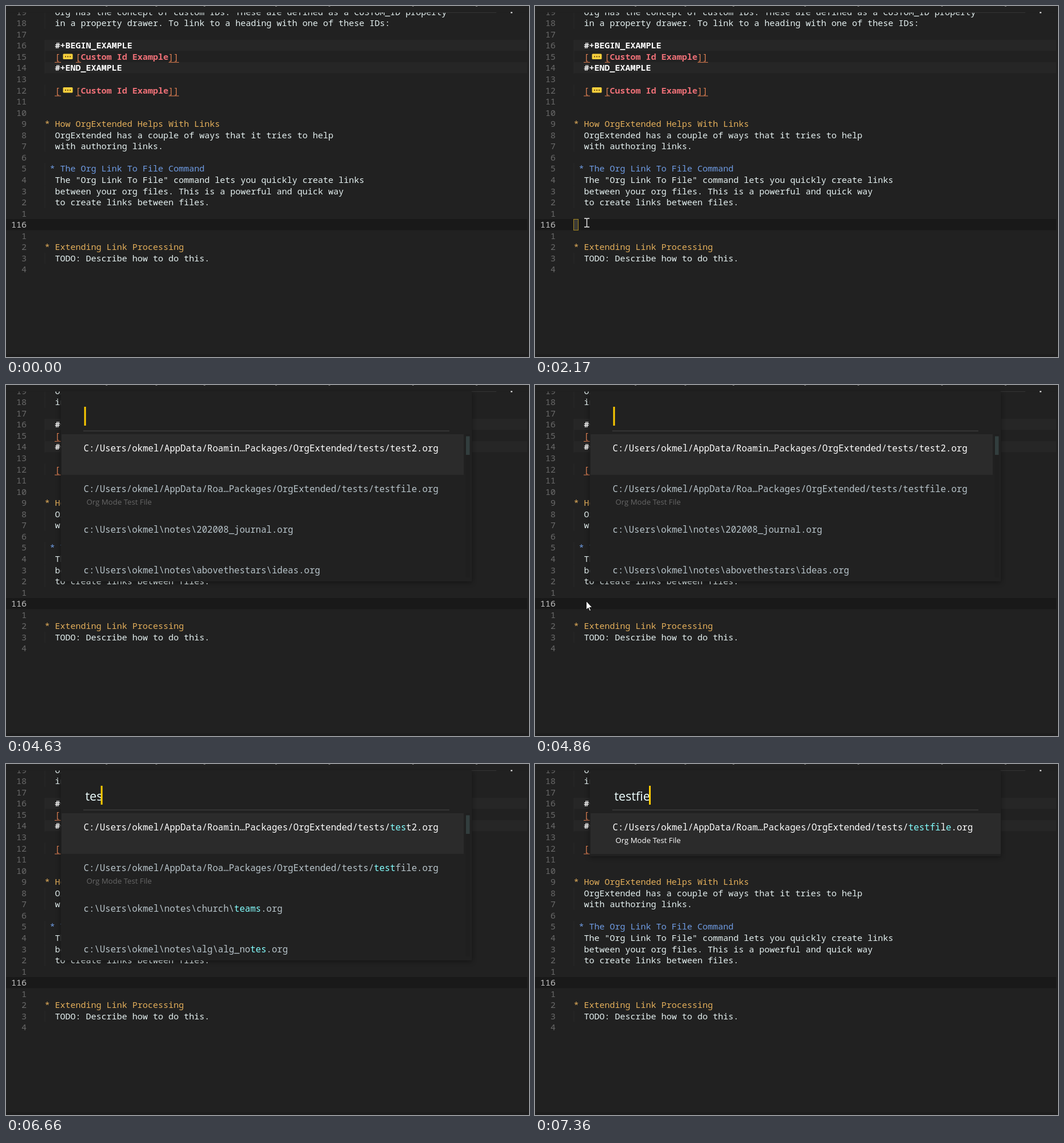
Write an HTML page that moves like this. It is 913x613 px and loops after 8000 ms.

```html
<!DOCTYPE html>
<html lang="en">
<head>
<meta charset="utf-8">
<title>Org link to file</title>
<style>
html, body { margin: 0; width: 100%; height: 100%; overflow: hidden; background: #212121; }
svg { display: block; }
text { white-space: pre; font: 300 15px "Noto Sans Mono", monospace; fill: #e6f2f2; }
.num { fill: #6a6a6a; text-anchor: end; }
.now { fill: #c4c4c4; }
.head { fill: #e5b05b; }
.sub { fill: #6f9ce4; }
.bold { font-weight: 700; fill: #fff; }
.link { fill: #df7f52; }
.name { font-weight: 700; fill: #f07178; }
.ui { font: 16.35px "Open Sans", sans-serif; fill: #b0bec5; }
.path { font-weight: 400; font-size: 15.65px; fill: #b8c4ca; }
.small { font: 13.2px "Open Sans", sans-serif; fill: #666; }
.input { font: 21.5px "Open Sans", sans-serif; fill: #eff; }
.on { fill: #fff; }
.hit { fill: #84ffff; }
.ui .hit { font-weight: 700; }
#popup { filter: drop-shadow(0 2px 4px #0006); }
</style>
</head>
<body>
<svg width="913" height="613" viewBox="0 0 913 613">
  <defs><clipPath id="view"><rect x="97" y="12" width="716" height="324"/></clipPath></defs>
  <g id="editor"></g>
  <rect id="block" x="67.5" y="372.5" width="8" height="19" fill="#3b3a35" stroke="#a48721"/>
  <g id="popup"></g>
  <path id="beam" d="M-4.5-7.5h3.5l1 1 1-1h3.5M0-6.5v13M-4.5 7.5h3.5l1-1 1 1h3.5" fill="none" stroke="#eee" stroke-width="1.4"/>
  <path id="arrow" d="M89.5 377.5v15l3.5-3.3 2.4 5.4 2.1-1-2.3-5.1h4.6z" fill="#fff" stroke="#000" stroke-width=".8"/>
</svg>
<script>
const $ = id => document.getElementById(id);
const rect = (x, y, w, h, fill, more = '') =>
  `<rect x="${x}" y="${y}" width="${w}" height="${h}" fill="${fill}" ${more}/>`;
const text = (x, y, cls, s) => `<text x="${x}" y="${y}" class="${cls}">${s}</text>`;
const marked = s => s.split('|').map((p, i) => i % 2 ? `<tspan class="hit">${p}</tspan>` : p).join('');

// Editor: [column, class, text] per line; a class of "id" is a folded link
const PITCH = 19.55, COL = 9, LEFT = 67.5, CURRENT = 19;
const lines = [
  [2, '', 'Org has the concept of custom IDs. These are defined as a CUSTOM_ID property'],
  [2, '', 'in a property drawer. To link to a heading with one of these IDs:'],
  0,
  [2, 'bold', '#+BEGIN_EXAMPLE'],
  [2, 'id'],
  [2, 'bold', '#+END_EXAMPLE'],
  0,
  [2, 'id'],
  0, 0,
  [0, 'head', '* How OrgExtended Helps With Links'],
  [2, '', 'OrgExtended has a couple of ways that it tries to help'],
  [2, '', 'with authoring links.'],
  0,
  [1, 'sub', '* The Org Link To File Command'],
  [2, '', 'The "Org Link To File" command lets you quickly create links'],
  [2, '', 'between your org files. This is a powerful and quick way'],
  [2, '', 'to create links between files.'],
  0, 0, 0,
  [0, 'head', '* Extending Link Processing'],
  [2, '', 'TODO: Describe how to do this.'],
  0
];

function foldedLink(y) {
  const col = n => LEFT + COL * n;
  const dots = [104, 108, 112].map(x => rect(x - 1, y - 6.5, 2, 2, '#6b4a12')).join('');
  return text(col(2), y, 'link', '[') + text(col(6), y, 'link', '[') +
    text(col(7), y, 'name', 'Custom Id Example') + text(col(24), y, 'link', ']]') +
    rect(99.5, y - 10.5, 17, 9.5, '#f6cf3c', 'rx="1.5"') + dots +
    `<path d="M85 ${y + 4.5}h11M122 ${y + 4.5}h9M284 ${y + 4.5}h18" stroke="#df7f52"/>`;
}

function drawEditor() {
  let out = rect(68, 59, 842, 19.5, '#262626') + rect(68, 98, 842, 19.5, '#262626') +
    rect(0, 372, 910, 19.5, '#191919');
  lines.forEach((line, i) => {
    const y = 15.7 + PITCH * i, here = i === CURRENT;
    out += text(36, y, here ? 'num now' : 'num', here ? 116 : Math.abs(CURRENT - i));
    if (!line) return;
    const [col, cls, s] = line;
    if (col) out += rect(67.5, y - 15, 1, PITCH, '#2b2b2b');
    out += cls === 'id' ? foldedLink(y) : text(LEFT + COL * col, y, cls, s);
  });
  const specks = [174, 261, 345, 470, 563, 709, 820].map(x => `M${x} .5h3`).join('');
  return out + rect(0, 0, 913, 11.5, '#212121') +
    `<path d="${specks}" stroke="#777"/>` +
    rect(747, 11, 109, 1, '#353535') + rect(881, 10.5, 3, 2, '#eee') +
    rect(0, 608, 913, 5, '#1d1d1d') + rect(911, 0, 2, 613, '#1e1e1e');
}

// Popup contents
const roaming = 'C:/Users/okmel/AppData/', tests = '…Packages/OrgExtended/tests/';
const notes = 'c:\\Users\\okmel\\notes\\';
const title = 'Org Mode Test File';
const test2 = s => [roaming + 'Roamin' + tests + s];
const testFile = (s, cut = 'Roa') => [roaming + cut + tests + s, title];
const note = s => [notes + s];
const commands = [
  ['Org |Link To| File'],
  ['Org |Link To| Today'],
  ['Org Jump |To| Back|link|'],
  ['BracketHighlighter: |To|gg|l|e Str|in|g Brac|k|et Escape Mode'],
  ['Se|l|ect|i|o|n|: Expand |to| Brac|k|ets']
];

// [time, typed text, caret x, rows]
const states = [
  [3150, 'Link To', 217, commands],
  [4630, '', 138, [test2('test2.org'), testFile('testfile.org'),
    note('202008_journal.org'), note('abovethestars\\ideas.org')]],
  [6440, 't', 145, [note('church\\|t|eams.org'), note('church\\|t|ech.org'),
    test2('|t|est2.org'), testFile('|t|estfile.org')]],
  [6510, 'te', 157, [note('church\\|te|ams.org'), note('church\\|te|ch.org'),
    test2('|te|st2.org'), testFile('|te|stfile.org')]],
  [6660, 'tes', 167, [test2('|tes|t2.org'), testFile('|test|file.org'),
    note('church\\|teams|.org'), note('alg\\alg_no|tes|.org')]],
  [6890, 'test', 174.5, [test2('|test|2.org'), testFile('|test|file.org'),
    note('alg\\alg_no|tes|.org'), note('abovethe|st|ars\\ideas.org')]],
  [7140, 'testf', 182, [testFile('|testf|ile.org', 'Roam')]],
  [7210, 'testfi', 188.5, [testFile('|testfi|le.org', 'Roam')]],
  [7360, 'testfie', 200.5, [testFile('|testfi|l|e|.org', 'Roam')]]
];

function drawPopup([, typed, caret, rows]) {
  const isCmd = rows === commands, single = rows.length === 1;
  const pitch = isCmd ? 53.75 : 70.9, first = isCmd ? 117.6 : 116.2;
  let out = rect(95.5, 11, 718, single ? 150 : 332, '#212121', 'rx="2"') +
    rect(135, 79.5, 639, 1.5, '#3b3b3b') +
    rect(97, 86, single ? 716 : 702, single ? 71 : pitch, '#2b2b2b');
  if (!single) {
    out += rect(802, 86, 8, 250, '#1f1f1f') +
      rect(803, 89.5, 6.5, isCmd ? 101.5 : 32.5, '#323e3e');
  }
  if (isCmd) {
    out += rect(136.5, 38.5, 81, 32, '#343434', 'rx="3" stroke="#474747"') +
      rect(182, 55, 2, 2, '#777') + rect(213, 55, 2, 2, '#777') +
      text(682, 332, 'small', 'Ctrl+Shift+M');
  }
  out += text(138.5, 64, 'input', typed) + rect(caret - 1.5, 38, 3, 33, '#fc0');
  const list = rows.map(([label, sub], i) => {
    const y = first + pitch * i, on = i ? '' : ' on';
    return text(135.5, y, (isCmd ? 'ui' : 'path') + on, marked(label)) +
      (sub ? text(140.5, y + 22, 'small' + on, sub) : '');
  });
  return out + `<g clip-path="url(#view)">${list.join('')}</g>`;
}

// Pointer stops: [time, x, y]
const stops = [
  [690, 660, 551], [760, 520, 445], [830, 365, 333],
  [1000, 290, 339], [1070, 200, 335], [1140, 121, 336],
  [1390, 119, 338], [1468, 112, 348], [1546, 103, 360], [1624, 95, 371], [1702, 90.5, 378.5]
];
const latest = (list, t) => list.findLast(e => e[0] <= t);
const show = (id, on) => $(id).setAttribute('visibility', on ? 'visible' : 'hidden');
let shown;

function frame(now) {
  const t = now % 8000, stop = latest(stops, t), state = latest(states, t);
  show('beam', stop && !state);
  if (stop) $('beam').setAttribute('transform', `translate(${stop[1]} ${stop[2]})`);
  const step = Math.floor((t - 1702) / 78);
  show('block', !state && step > 0);
  $('block').setAttribute('opacity', Math.max(0, Math.min(1, step / 6)));
  show('arrow', t >= 4860 && t < 6440);
  if (state !== shown) {
    $('popup').innerHTML = state ? drawPopup(state) : '';
    shown = state;
  }
  requestAnimationFrame(frame);
}

$('editor').innerHTML = drawEditor();
frame(0);
</script>
</body>
</html>
```
